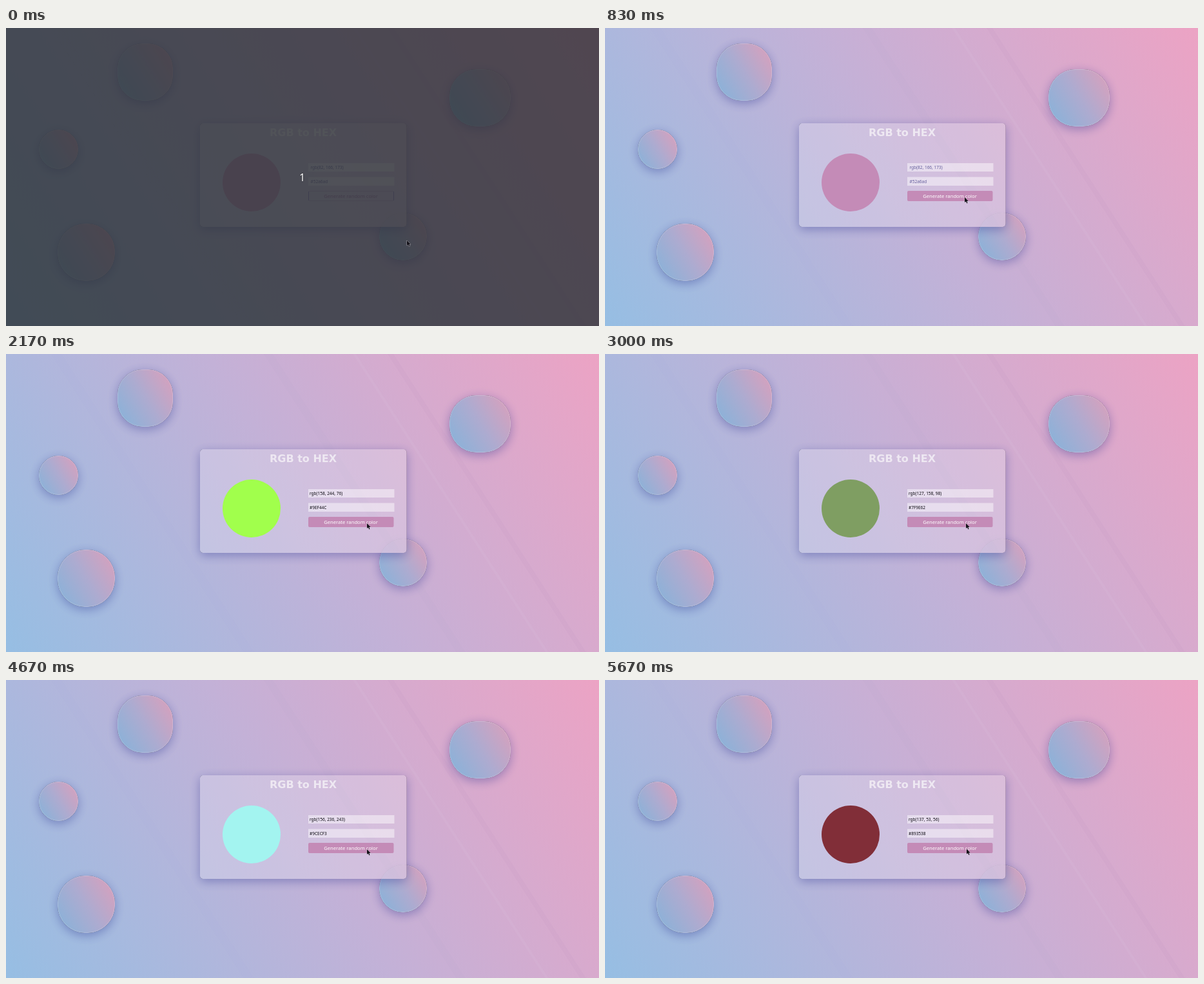
An HTML page with a canvas for the animation above (6340 ms loop, 920 by 463 pixels).

```html
<!DOCTYPE html>
<html lang="en">
<head>
<meta charset="utf-8">
<title>RGB to HEX</title>
<style>
html, body { margin: 0; width: 100%; height: 100%; overflow: hidden; }
canvas { display: block; }
</style>
</head>
<body>
<canvas id="stage" width="920" height="463"></canvas>
<script>
const W = 920, H = 463, LOOP = 6340;
const ctx = document.getElementById('stage').getContext('2d');
const backdrop = document.createElement('canvas');
backdrop.width = W;
backdrop.height = H;

const MAUVE = '#c48bb7';
const CARD = [301, 148, 320.5, 161, 5];
// x, y, width, height, corner radius
const BLOBS = [
  [173, 24, 86, 89, 39],
  [688, 64, 95, 89, 42],
  [51, 158, 61, 61, 30.5],
  [80, 304, 89, 89, 43],
  [579, 287, 74, 74, 37]
];

// start time, swatch colour, rgb text, hex text
const COLORS = [
  [0, MAUVE, 'rgb(82, 166, 173)', '#52a6ad'],
  [1330, '#4dbec7', 'rgb(67, 180, 203)', '#43B4CB'],
  [2170, '#a1ff4c', 'rgb(158, 244, 76)', '#9EF44C'],
  [3000, '#7f9e62', 'rgb(127, 158, 98)', '#7F9E62'],
  [3830, '#45c2a1', 'rgb(58, 180, 162)', '#3AB4A2'],
  [4670, '#a3f4f0', 'rgb(156, 236, 243)', '#9CECF3'],
  [5670, '#812e38', 'rgb(137, 53, 56)', '#893538']
];

// start time, pointer tip
const POINTER = [
  [0, 622, 330], [500, 562, 281], [670, 560, 276], [830, 558, 263],
  [1000, 560, 263], [5170, 560, 262], [5330, 561, 262.5]
];

const at = (steps, t) => steps.filter(s => s[0] <= t).pop();

function slantGradient(c, x, y, w, h, stops) {
  const a = 57.5 * Math.PI / 180;
  const len = (w * Math.sin(a) + h * Math.cos(a)) / 2;
  const dx = len * Math.sin(a), dy = -len * Math.cos(a);
  const cx = x + w / 2, cy = y + h / 2;
  const g = c.createLinearGradient(cx - dx, cy - dy, cx + dx, cy + dy);
  stops.forEach((s, i) => g.addColorStop(i / (stops.length - 1), s));
  return g;
}

function box(c, x, y, w, h, r) {
  c.beginPath();
  c.roundRect(x, y, w, h, r);
}

// Soft shadow drawn only outside the shape
function outerShadow(c, shape) {
  c.save();
  c.beginPath();
  c.rect(0, 0, W, H);
  c.roundRect(...shape);
  c.clip('evenodd');
  c.shadowColor = 'rgba(31,38,135,0.37)';
  c.shadowBlur = 16;
  c.shadowOffsetY = 4;
  c.fillStyle = '#000';
  box(c, ...shape);
  c.fill();
  c.restore();
}

function drawBlob(c, shape) {
  const [x, y, w, h, r] = shape;
  outerShadow(c, shape);
  box(c, x, y, w, h, r);
  c.fillStyle = slantGradient(c, x, y, w, h, ['#84b3da', '#adabd0', '#dd9fba']);
  c.fill();
  box(c, x + 0.5, y + 0.5, w - 1, h - 1, r - 0.5);
  c.strokeStyle = 'rgba(255,255,255,0.18)';
  c.lineWidth = 1;
  c.stroke();
}

function paintSky(c) {
  c.fillStyle = slantGradient(c, 0, 0, W, H, ['#96bee3', '#c3b1d7', '#eca3c4']);
  c.fillRect(0, 0, W, H);
  // faint slanted streaks: x at the top, width, tint
  const streaks = [
    [592, 9, 'rgba(130,90,150,0.045)'],
    [538, 5, 'rgba(255,255,255,0.03)'],
    [400, 14, 'rgba(130,110,170,0.025)'],
    [70, 16, 'rgba(110,120,190,0.025)']
  ];
  for (const [x, w, tint] of streaks) {
    const run = H * 0.645;
    c.fillStyle = tint;
    c.beginPath();
    c.moveTo(x, 0);
    c.lineTo(x + w, 0);
    c.lineTo(x + w + run, H);
    c.lineTo(x + run, H);
    c.fill();
  }
}

function paintBackdrop() {
  const c = backdrop.getContext('2d');
  paintSky(c);
  BLOBS.forEach(b => drawBlob(c, b));
  outerShadow(c, CARD);

  // Frosted card: blobs behind it nearly vanish
  c.save();
  box(c, ...CARD);
  c.clip();
  paintSky(c);
  c.globalAlpha = 0.2;
  drawBlob(c, BLOBS[4]);
  c.globalAlpha = 1;
  c.fillStyle = 'rgba(255,255,255,0.2)';
  c.fillRect(...CARD.slice(0, 4));
  c.restore();

  c.fillStyle = 'rgba(255,255,255,0.46)';
  c.fillRect(469, 210, 133.5, 13);
  c.fillRect(469, 231.5, 133.5, 13.5);
  label(c, 'RGB to HEX', 461, 168, 'bold 16px "DejaVu Sans", sans-serif', '#eee8f2', 'center');
}

function label(c, text, x, y, font, color, align = 'left') {
  c.font = font;
  c.fillStyle = color;
  c.textAlign = align;
  c.fillText(text, x, y);
}

function drawButton(hover) {
  if (hover) {
    box(ctx, 469, 253, 132.5, 16, 2);
    ctx.fillStyle = MAUVE;
    ctx.fill();
  } else {
    box(ctx, 469.5, 253.5, 132, 15, 2);
    ctx.lineWidth = 1;
    ctx.strokeStyle = 'rgba(185,150,195,0.75)';
    ctx.stroke();
    ctx.fillStyle = 'rgba(118,105,180,0.75)';
    ctx.fillRect(469, 254, 1, 14);
    ctx.fillRect(601, 254, 1, 14);
  }
  label(ctx, 'Generate random color', 535, 263.8, '7.65px "Noto Sans", sans-serif',
    hover ? '#fff' : '#99659f', 'center');
}

function drawPointer(x, y, edge) {
  ctx.save();
  ctx.translate(x, y);
  ctx.beginPath();
  [[0, 0], [0, 8], [2, 6.4], [3.3, 9.5], [4.6, 9], [3.4, 6], [5.8, 6]]
    .forEach(p => ctx.lineTo(...p));
  ctx.closePath();
  ctx.lineWidth = 0.8;
  ctx.strokeStyle = edge;
  ctx.fillStyle = '#15131a';
  ctx.stroke();
  ctx.fill();
  ctx.restore();
}

function draw(t) {
  const [start, color, rgb, hex] = at(COLORS, t);
  const [, px, py] = at(POINTER, t);
  const fresh = start === 0;
  const dim = t < 170;

  ctx.drawImage(backdrop, 0, 0);
  ctx.beginPath();
  ctx.arc(381, 240, 45, 0, Math.PI * 2);
  ctx.fillStyle = color;
  ctx.fill();

  const font = '6.5px "Noto Sans", sans-serif';
  const ink = fresh ? '#655f9c' : '#0c0a12';
  const x = fresh ? 472.5 : 471;
  label(ctx, rgb, x, 219, font, ink);
  label(ctx, hex, x, 240.8, font, ink);
  drawButton(t >= 830);

  if (dim) {
    ctx.fillStyle = 'rgba(47,50,56,0.82)';
    ctx.fillRect(0, 0, W, H);
    ctx.save();
    ctx.shadowColor = 'rgba(0,0,0,0.7)';
    ctx.shadowBlur = 2;
    label(ctx, '1', 459.5, 237.5, '16px "Noto Sans", sans-serif', '#fff', 'center');
    ctx.restore();
  }
  drawPointer(px, py, dim ? '#c9c5cc' : 'rgba(255,255,255,0.45)');
}

paintBackdrop();
const began = performance.now();
function tick() {
  draw((performance.now() - began) % LOOP);
  requestAnimationFrame(tick);
}
tick();
</script>
</body>
</html>
```
